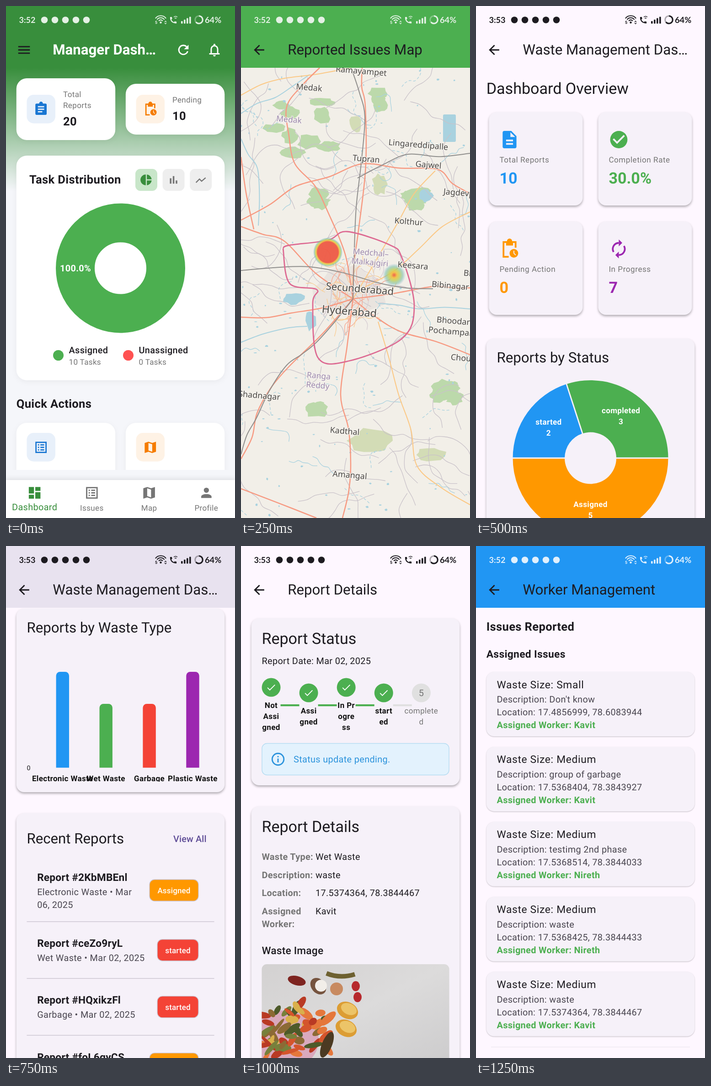
These frames come from a looping animation (501x1119 px, 1500 ms). An HTML page:

```html
<!DOCTYPE html>
<html lang="en">
<head>
<meta charset="utf-8">
<title>Waste management app</title>
<style>
html, body { margin: 0; width: 501px; height: 1119px; overflow: hidden; background: #fef7ff; }
svg { position: absolute; left: 0; top: 0; font-family: Roboto, sans-serif; text-rendering: geometricPrecision; }
.low { filter: drop-shadow(0 1.5px 1.2px rgba(0,0,0,.24)); }
.high { filter: drop-shadow(0 3px 2.5px rgba(0,0,0,.3)); }
.soft { filter: drop-shadow(0 3px 6px rgba(0,0,0,.05)); }
</style>
</head>
<body>
<script>
const W = 501, H = 1119, HOLD = 250;
const DP = 1.4195, EDGE = 16 * DP, INSET = 32 * DP;
const INK = '#1d1b20', GREY = '#757575', DIM = '#49454f', GREEN = '#4caf50', DEEP = '#388e3c', BLUE = '#2196f3',
  ORANGE = '#ff9800', RED = '#f44336', PURPLE = '#9c27b0', PAGE = '#fef7ff', CARD = '#f6f1f9';
const WORKER_A = 'Kavit', WORKER_B = 'Nireth';

// Icons on a 24 unit grid: [filled part, stroked part]
const DISC = 'M2 12a10 10 0 1 0 20 0a10 10 0 1 0-20 0z';
const ICONS = {
  menu: ['', 'M3 7h18M3 12h18M3 17h18'],
  back: ['', 'M20 12H5.500M12.700 4.700L5.400 12l7.300 7.300'],
  refresh: ['M20 4v7h-7z', 'M18.700 14a7 7 0 1 1-1.700-7'],
  bell: ['M10 20h4a2 2 0 0 1-4 0zM10.500 5V4a1.500 1.500 0 0 1 3 0v1z', 'M4 18h16M7 18v-7a5 5.500 0 0 1 10 0v7'],
  clipboard: ['M5 3h4a3 3 0 0 1 6 0h4q2 0 2 2v14q0 2-2 2H5q-2 0-2-2V5q0-2 2-2zM7 7h10v2H7zM7 11h10v2H7zM7 15h7v2H7z', ''],
  pending: ['M8 3h1a3 3 0 0 1 6 0h1v5H8zM12 17a5 5 0 1 0 10 0a5 5 0 1 0-10 0zM16.500 14h1v2.800l1.900 1.900-.7.700-2.200-2.200z', 'M11 21H5V4h14v6.500'],
  pie: ['M11 2a10 10 0 0 0 0 20zM13 2v9h9a10 10 0 0 0-9-9zM13 13v9a10 10 0 0 0 9-9z', ''],
  bars: ['', 'M6.500 9v10M12 5v14M17.500 13v6'],
  trend: ['', 'M3 17l6.500-6.500 4 4L21 8'],
  list: ['', 'M4 4h16v16H4zM7 8h2m2 0h6M7 12h2m2 0h6M7 16h2m2 0h6'],
  map: ['M3 5l6-2 6 2 6-2v16l-6 2-6-2-6 2zM9 5v12l6 2V7z', ''],
  tiles: ['M3 3h8v10H3zM3 15h8v6H3zM13 11h8v10h-8zM13 3h8v6h-8z', ''],
  person: ['M8 8a4 4 0 1 0 8 0a4 4 0 1 0-8 0zM4 20v-2c0-5.300 16-5.300 16 0v2z', ''],
  page: ['M6 2h8l6 6v12q0 2-2 2H6q-2 0-2-2V4q0-2 2-2zM13 3.500V9h5.500zM8 12h8v2H8zM8 16h8v2H8z', ''],
  done: [DISC + 'M10 17l-5-5 1.400-1.400 3.600 3.600 7.600-7.600L19 8z', ''],
  renew: ['M12 1v8l4-4zM12 23v-8l-4 4z', 'M12 5a7 7 0 0 0-6 10.500M12 19a7 7 0 0 0 6-10.500'],
  check: ['', 'M4 12.700l5 5L20.300 6.400'],
  info: ['', 'M3 12a9 9 0 1 0 18 0a9 9 0 1 0-18 0zM12 7v2m0 2v6'],
  phone: ['M4 3h4l1 5-2.500 2.500q2.500 5 7 7L16 15l5 1v4q0 1-1 1Q3 20 3 4q0-1 1-1z', '']
};

const range = (n, fn) => Array.from({ length: n }, (_, i) => fn(i)).join('');
const each = (list, fn) => list.map(fn).join('');
const rect = (x, y, w, h, fill, r = 0, extra = '') =>
  `<rect x="${x}" y="${y}" width="${w}" height="${h}" rx="${r}" fill="${fill}" ${extra}/>`;
const circle = (x, y, r, fill, extra = '') => `<circle cx="${x}" cy="${y}" r="${r}" fill="${fill}" ${extra}/>`;
const oval = (x, y, rx, ry, fill, turn = 0) =>
  `<ellipse cx="${x}" cy="${y}" rx="${rx}" ry="${ry}" fill="${fill}" transform="rotate(${turn} ${x} ${y})"/>`;
const line = (d, stroke, w, extra = '') =>
  `<path d="${d}" fill="none" stroke="${stroke}" stroke-width="${w}" ${extra}/>`;
const icon = (name, x, y, size, fill, w = 2) =>
  `<g transform="translate(${x - size / 2} ${y - size / 2}) scale(${size / 24})">` +
  `<path d="${ICONS[name][0]}" fill="${fill}" fill-rule="evenodd"/>${line(ICONS[name][1], fill, name === 'bars' ? 3 : w)}</g>`;
const text = (x, y, s, size, fill = INK, { w = 400, ls = 0, mid = false, extra = '' } = {}) =>
  `<text x="${x}" y="${y}" font-size="${size}" fill="${fill}" font-weight="${w}" letter-spacing="${ls}"` +
  `${mid ? ' text-anchor="middle"' : ''} ${extra}>${s}</text>`;

const SPACE = .25 * DP;
const body = (x, y, s, fill = INK, w = 400, mid = false) => text(x, y, s, 14 * DP, fill, { w, ls: SPACE, mid });
const small = (x, y, s, fill = GREY, o = {}) => text(x, y, s, 12 * DP, fill, { ls: SPACE, ...o });
const large = (x, y, s, w = 400, ls = .5 * DP) => text(x, y, s, 16 * DP, INK, { w, ls });
const head = (x, y, s, w = 700) => text(x, y, s, 18 * DP, INK, { w, ls: SPACE });
const title = (x, y, s) => text(x, y, s, 22 * DP);
const display = (x, y, s, fill = INK, w = 400) => text(x, y, s, 24 * DP, fill, { w });
const card = (y, h, cls = 'high') => rect(EDGE, y, W - 2 * EDGE, h, CARD, 12 * DP, `class="${cls}"`);

// Seeded random numbers, one stream per picture
function random(seed) {
  return (a = 0, b = 1) => a + (b - a) * (seed = seed * 16807 % 2147483647) / 2147483647;
}

function statusBar(time, c) {
  const wave = r => line(`M${338.5 - r * .8} ${36 - r * .62}A${r} ${r} 0 0 1 ${338.5 + r * .8} ${36 - r * .62}`, c, 2.1);
  const clock = { w: 700, extra: 'font-family="Lato, sans-serif"' };
  const ring = extra => circle(422, 30, 8.3, 'none', `stroke="${c}" stroke-width="3" ${extra}`);
  return text(28.5, 36.5, time, 18, c, clock) + range(5, i => circle(84 + i * 23, 30.5, 7.3, c)) +
    range(3, i => wave(5.5 + i * 4.5)) + circle(338.5, 36, 2.2, c) +
    text(326, 39, '5', 9, c, { w: 700 }) + line('M347 35l2-2 2 2M347 37l2 2 2-2', c, 1.3) +
    icon('phone', 366, 31, 19, c) + line('M367 24q4-3 8 0M369 27q2-1.500 4 0', c, 1.4) +
    range(4, i => rect(383 + i * 6, 33 - i * 3.2, 3.6, 5.4 + i * 3.2, c, 1)) +
    ring('opacity=".35"') + ring('pathLength="100" stroke-dasharray="64 100" transform="rotate(-90 422 30)"') +
    text(435, 36.5, '64%', 18.3, c, clock);
}

function topBar(time, c, bg, name) {
  return rect(0, 0, W, 135, bg) + statusBar(time, c) + icon('back', 39.5, 96, 34, INK) + title(72 * DP, 106, name);
}

function home() {
  const half = (W - 3 * EDGE) / 2, second = 2 * EDGE + half;
  const panel = (x, y, w, h) => rect(x, y, w, h, '#fff', 16 * DP, 'class="soft"');
  const tile = (x, y, name, fill, bg) => rect(x, y, 62.5, 62.5, bg, 15) + icon(name, x + 31.2, y + 31.5, 33, fill);
  const blueTile = (y, name) => tile(INSET, y, name, '#1976d2', '#e8f0fa');
  const orangeTile = (y, name) => tile(second + EDGE, y, name, '#f57c00', '#fef2e5');
  const legend = (x, fill, name, count) => circle(x, 763.5, 11.5, fill) +
    body(x + 23, 759, name, INK, 500) + small(x + 23, 784, count);
  const tabs = each(['pie', 'bars', 'trend'], (name, i) => {
    const x = 283 + i * 59.6;
    return rect(x, 356, 48, 48, i ? '#eee' : '#c8e6c9', 11) + icon(name, x + 24, 380, 28, i ? GREY : DEEP);
  });
  const nav = each(['tiles Dashboard', 'list Issues', 'map Map', 'person Profile'], (item, i) => {
    const [name, label] = item.split(' '), x = W * (i + .5) / 4, c = i ? GREY : DEEP;
    return icon(name, x, 1064, 34, c) + (i ? small(x, 1103, label, c, { mid: true }) : body(x, 1102, label, c, 400, true));
  });
  return `<defs><linearGradient id="fade" x2="0" y2="1"><stop stop-color="${DEEP}"/><stop offset="1" stop-color="#f5f6fa"/></linearGradient>
    <clipPath id="list"><rect width="501" height="1014"/></clipPath></defs>` +
    rect(0, 0, W, H, '#f5f6fa') + rect(0, 135, W, 270, 'url(#fade)') + rect(0, 0, W, 136, DEEP) +
    statusBar('3:52', '#e4f1e5') + icon('menu', 39.5, 96, 34, INK) +
    text(72 * DP, 106, 'Manager Dash…', 22 * DP, '#fff', { w: 700 }) +
    icon('refresh', 388, 96, 34, '#fff') + icon('bell', 456, 96, 34, '#fff') +
    panel(EDGE, 158, half, 135) + blueTile(194, 'clipboard') +
    small(125, 199, 'Total') + small(125, 223, 'Reports') + head(125, 261, '20') +
    panel(second, 170, half, 111) + orangeTile(194, 'pending') + small(364, 211, 'Pending') + head(364, 249, '10') +
    panel(EDGE, 327, W - 2 * EDGE, 491) + head(51, 388, 'Task Distribution', 600) + tabs +
    circle(W / 2, 573, 99, 'none', `stroke="${GREEN}" stroke-width="85"`) +
    body(152, 580, '100.0%', '#fff', 700, true) +
    legend(114.5, GREEN, 'Assigned', '10 Tasks') + legend(267.5, '#ff5252', 'Unassigned', '0 Tasks') +
    head(EDGE, 878, 'Quick Actions', 600) +
    `<g clip-path="url(#list)">${panel(EDGE, 911, half, 200)}${panel(second, 911, half, 200)}</g>` +
    blueTile(933, 'list') + orangeTile(933, 'map') +
    rect(0, 1036, W, 83, '#fff', 0, 'style="filter:drop-shadow(0 -3px 5px rgba(0,0,0,.09))"') + nav;
}

function mapScreen() {
  const rnd = random(11), top = 135, hub = '245,640 ';
  const anywhere = () => [rnd(0, W), rnd(top, H)];
  const parse = s => s.trim().split(' ').map(p => p.split(',').map(Number));
  const curve = p => {
    let d = `M${p[0]}`;
    for (let i = 0; i < p.length - 1; i++) {
      const a = p[i - 1] || p[i], b = p[i], c = p[i + 1], e = p[i + 2] || c;
      d += `C${b[0] + (c[0] - a[0]) / 6} ${b[1] + (c[1] - a[1]) / 6} ${c[0] - (e[0] - b[0]) / 6} ${c[1] - (e[1] - b[1]) / 6} ${c}`;
    }
    return d;
  };
  // Adds a slightly displaced point inside every stretch
  const wander = p => p.flatMap((a, i) => {
    if (!i) return [a];
    const b = p[i - 1], k = rnd(-.07, .07);
    return [[(a[0] + b[0]) / 2 + (a[1] - b[1]) * k, (a[1] + b[1]) / 2 - (a[0] - b[0]) * k], a];
  });
  const way = (c, w) => s => line(curve(wander(parse(s))), c, w);
  const trunk = way('#f79a82', 2.5), main = way('#fbc987', 2.1), rail = way('#8f8e8c', 2), river = way('#a9d2df', 2);
  const walk = ([x, y], n, step, bend) => {
    let a = rnd(0, 6.28);
    const p = [[x, y]];
    while (n--) {
      a += rnd(-bend, bend);
      p.push([x += Math.cos(a) * step, y += Math.sin(a) * step]);
    }
    return curve(p);
  };
  const blob = (x, y, rx, ry, fill) => `<polygon fill="${fill}" points="${range(14, i => {
    const k = rnd(.7, 1.1), a = i * Math.PI / 7;
    return `${x + Math.cos(a) * rx * k},${y + Math.sin(a) * ry * k} `;
  })}"/>`;
  const WATER = '#a9d2df', WOOD = '#bcd9ab', KHAKI = '#d3dcb6';
  const forest = (x, y, n, spread) => range(n, () =>
    blob(x + rnd(-spread, spread), y + rnd(-.6, .6) * spread, rnd(14, 30), rnd(10, 20), WOOD));
  const land = forest(135, 220, 4, 48) + forest(140, 308, 6, 75) + forest(158, 420, 4, 16) + forest(300, 205, 3, 22) +
    forest(382, 425, 4, 26) + forest(452, 840, 8, 32) + forest(165, 880, 2, 12) +
    blob(250, 258, 14, 20, KHAKI) + blob(303, 390, 17, 26, KHAKI) + blob(280, 950, 52, 26, KHAKI) + blob(415, 981, 36, 15, KHAKI);
  const water = range(130, () => blob(...anywhere(), rnd(1, 4), rnd(1, 3), WATER)) +
    rect(442, 237, 28, 60, WATER, 3) + blob(405, 415, 16, 15, WATER) + blob(115, 640, 26, 14, WATER) + blob(152, 688, 13, 22, WATER) +
    range(46, i => line(walk(anywhere(), 6, 11, 1), WATER, 1.3, i % 2 ? 'stroke-dasharray="6 4"' : ''));
  const lanes = range(85, () => line(walk(anywhere(), 7, 20, .65), '#c9c2c9', 1.3)) +
    range(60, i => line(walk([238 + rnd(-70, 70), 622 + rnd(-62, 62)], 4, 12, .8), ['#f9cf98', '#d8cfd4', '#f7ab95'][i % 3], 1.4));
  const roads = river('0,235 75,200 150,150') + river('0,290 36,355 38,480') + river('300,650 390,662 501,662') + river('0,735 95,705 145,700') +
    main('0,195 95,158 240,135') + main(hub + '345,470 425,360') + main('300,690 345,850 385,1005 501,1090') + main('501,450 390,530 270,615') +
    trunk(hub + '257,490 272,220 265,135') + trunk(hub + '190,450 118,345 100,220 172,135') + trunk(hub + '95,514 0,482') +
    trunk(hub + '110,671 0,680') + trunk(hub + '420,613 501,616') + trunk(hub + '350,712 501,762') +
    trunk(hub + '218,850 240,1000 222,1119') + trunk(hub + '105,788 35,890 0,990') +
    trunk('0,468 120,394 265,345 430,357 501,410') + trunk('0,1055 165,1119') + trunk('0,330 28,488') +
    rail(hub + '252,440 271,243 241,135') + rail(hub + '165,735 100,785 34,900 0,980') +
    rail('0,578 150,570 300,605 420,618') + rail('255,376 365,324 501,322') +
    line(curve(parse('92,530 105,523 190,512 232,493 325,522 352,550 379,655 352,727 235,776 168,768 157,650 166,620 106,606 92,530')), '#dd6a92', 2.8);

  const SPECTRUM = ['#ee5a45', '#f3c244', '#c0d060', '#74bda4', '#6fa8d0'];
  const heat = (id, x, y, r, core) => `<radialGradient id="${id}">${each(SPECTRUM, (c, i) =>
    `<stop offset="${core + (1 - core) * i / 4}" stop-color="${c}" stop-opacity="${.95 * (1 - (i / 4) ** 3)}"/>`)}</radialGradient>` +
    circle(x, y, r, `url(#${id})`);

  const label = (x, y, s, size = 18, fill = '#4a4845', anchor = 'middle') =>
    `<text transform="translate(${x} ${y}) rotate(4.8)" dy=".35em" font-size="${size}" fill="${fill}" text-anchor="${anchor}">${s}</text>`;
  const region = (x, y, s) => label(x, y, s, 17.5, '#9d89ae');
  const open = (x, y, s) => label(x, y, s, 18, '#4a4845', 'start');
  const names = region(105, 248, 'Medak') + region(284, 539, 'Medchal–') + region(282, 560, 'Malkajgiri') +
    region(170, 808, 'Ranga') + region(168, 829, 'Reddy') +
    label(263, 142, 'Ramayampet') + label(149, 178, 'Medak') + label(388, 303, 'Lingareddipalle') + label(274, 334, 'Tupran') +
    label(410, 347, 'Gajwel') + label(367, 471, 'Kolthur') + label(376, 567, 'Keesara') + label(458, 611, 'Bibinagar') +
    label(40, 851, 'Shadnagar') + label(227, 929, 'Kadthal') + label(238, 1025, 'Amangal') +
    open(443, 405, 'Jagdevpur') + open(487, 583, 'Bhongir') + open(428, 685, 'Bhoodan') + open(410, 707, 'Pochampally') +
    open(459, 767, 'Choutuppal') + label(260, 618, 'Secunderabad', 22) + label(237, 667, 'Hyderabad', 23.3);
  return rect(0, top, W, H - top, '#f2efe8') + land + blob(238, 620, 80, 65, '#e9e4df') + water + lanes + roads +
    heat('hot', 190, 538, 32, .72) + heat('warm', 335, 588, 25, 0) +
    `<g font-family="Noto Sans, sans-serif" stroke="#f6f4ef" stroke-width="3" stroke-opacity=".8" paint-order="stroke">${names}</g>` +
    topBar('3:52', '#e4f1e5', GREEN, 'Reported Issues Map');
}

function overview() {
  const stats = [['page', 'Total Reports', '10', BLUE], ['done', 'Completion Rate', '30.0%', GREEN],
    ['pending', 'Pending Action', '0', ORANGE], ['renew', 'In Progress', '7', PURPLE]];
  const stat = ([name, label, value, c], i) => {
    const x = 28.4 + i % 2 * 239, y = 232 + (i >> 1) * 239;
    return rect(x, y, 205, 204, CARD, 12 * DP, 'class="high"') + icon(name, x + 45, y + 60, 32 * DP, c) +
      small(x + 23, y + 110, label, GREY, { ls: .4 * DP }) + display(x + 23, y + 156, value, c, 700);
  };
  const parts = [['completed', 3, GREEN], ['started', 2, BLUE], ['Assigned', 5, ORANGE]];
  const cx = W / 2, cy = 988, R = 170, r = 56.5;
  const at = (turn, rad) => [cx + rad * Math.cos(turn * 2 * Math.PI), cy - rad * Math.sin(turn * 2 * Math.PI)];
  let turn = 0, slices = '', seams = '', tags = '';
  for (const [name, n, c] of parts) {
    const end = turn + n / 10, [x, y] = at((turn + end) / 2, (R + r) / 2);
    slices += `<path fill="${c}" d="M${at(turn, r)}L${at(turn, R)}A${R} ${R} 0 0 0 ${at(end, R)}L${at(end, r)}A${r} ${r} 0 0 1 ${at(turn, r)}"/>`;
    seams += line(`M${at(turn, r - 1)}L${at(turn, R + 1)}`, CARD, 2.8);
    tags += [name, n].map((s, i) => small(x, y - 6 + i * 24, s, '#fff', { w: 700, mid: true })).join('');
    turn = end;
  }
  return rect(0, 0, W, H, PAGE) + topBar('3:53', INK, PAGE, 'Waste Management Das…') +
    display(EDGE, 192, 'Dashboard Overview') + each(stats, stat) +
    card(727, 480) + title(INSET, 779, 'Reports by Status') + slices + seams + tags;
}

function reports() {
  const types = [['Electronic Waste', 3, BLUE], ['Wet Waste', 2, GREEN], ['Garbage', 2, RED], ['Plastic Waste', 3, PURPLE]];
  const list = [['2KbMBEnl', 'Assigned', 'Electronic Waste • Mar', '06, 2025'], ['ceZo9ryL', 'started', 'Wet Waste • Mar 02, 2025'],
    ['HQxikzFl', 'started', 'Garbage • Mar 02, 2025'], ['foL6gyCS', 'Assigned', '']];
  const base = 484.5, bar = 20 * DP;
  const chart = each(types, ([name, n, c], i) => {
    const x = 109.6 + i * 94.9, h = n * 69.8;
    return `<g clip-path="url(#plot)">${rect(x, base - h, bar, h + 20, c, 6 * DP)}</g>` +
      `<g clip-path="url(#axis)">${small(x + bar / 2, 514, name, '#111', { w: 700, mid: true })}</g>`;
  });
  let y = 677;
  const rows = each(list, ([id, state, ...lines]) => {
    const extra = lines.length - 1, mid = y + 62 + extra * 13.5, busy = state === 'started', w = busy ? 90 : 107;
    const row = text(48 * DP, y + 55, `Report #${id}`, 16 * DP, INK, { w: 700, ls: .15 * DP }) +
      each(lines, (s, i) => body(48 * DP, y + 86 + i * 28.4, s, DIM)) +
      rect(421 - w, mid - 23.5, w, 47, busy ? RED : ORANGE, 11, 'stroke="#cac4d0" stroke-width="1.4"') +
      small(421 - w / 2, mid + 6.5, state, '#fff', { w: 500, ls: .14, mid: true });
    y += 124.2 + extra * 20;
    return row + rect(INSET, y - .9, W - 2 * INSET, 1.4, '#cac4d0');
  });
  return `<defs><clipPath id="plot"><rect width="501" height="${base}"/></clipPath>
    <clipPath id="axis"><rect y="490" width="501" height="25"/></clipPath></defs>` +
    rect(0, 0, W, H, PAGE) + card(137, 401) + topBar('3:53', INK, '#e8e2ef', 'Waste Management Das…') +
    title(INSET, 189, 'Reports by Waste Type') + text(INSET, 490, '0', 10 * DP) + chart +
    card(584, 600) + title(INSET, 650, 'Recent Reports') +
    text(366, 647, 'View All', 14 * DP, '#5f4d97', { w: 500, ls: .14 }) + rows;
}

function photo() {
  const rnd = random(5), SCRAPS = ['#e5773b', '#b93a24', '#77803c', '#d9b04c', '#8c6a35', '#4d5a2a', '#d4552c'];
  const scraps = range(60, i => {
    const x = rnd(45, 195), y = rnd(990 + Math.abs(x - 115) * .5, H);
    return oval(x, y, rnd(9, 22), rnd(4, 9), SCRAPS[i % SCRAPS.length], rnd(-70, 60));
  });
  const stains = range(25, () => oval(rnd(260, 456), rnd(920, H), rnd(15, 50), rnd(6, 20), i % 2 ? '#e8e7e7' : '#cfcecf', rnd(-40, 40)));
  return '';
}

function wastePhoto() {
  const rnd = random(5), SCRAPS = ['#e5773b', '#b93a24', '#77803c', '#d9b04c', '#8c6a35', '#4d5a2a', '#d4552c'];
  const scraps = range(60, i => {
    const x = rnd(45, 195), y = rnd(990 + Math.abs(x - 115) * .5, H);
    return oval(x, y, rnd(9, 22), rnd(4, 9), SCRAPS[i % SCRAPS.length], rnd(-70, 60));
  });
  const lemon = (x, y) => oval(x, y, 24, 18, '#dc9d34', 25) + oval(x + 3, y - 3, 18, 12, '#ecc468', 25);
  const berry = (x, y) => oval(x, y, 9, 11, '#b7292d');
  return `<defs><linearGradient id="stone" x2="1" y2="1"><stop stop-color="#d3d1d1"/><stop offset=".5" stop-color="#dcdbdb"/><stop offset="1" stop-color="#cdcccd"/></linearGradient>
    <clipPath id="frame"><rect x="${INSET}" y="914" width="${W - 2 * INSET}" height="240" rx="11"/></clipPath></defs>
    <g clip-path="url(#frame)">` + rect(45, 914, 411, 210, 'url(#stone)') +
    oval(95, 1080, 75, 65, '#d9a9bd') + scraps +
    oval(122, 950, 20, 10, '#7e2420', 15) + line('M187 934q30 12 62 2', '#6d6030', 10) +
    oval(169, 962, 20, 15, '#76543f', 50) + circle(175, 961, 13, '#f2eee9') + circle(209, 968, 14, '#c88a60') +
    berry(251, 962) + berry(255, 986) + lemon(233, 1015) + lemon(230, 1054) +
    oval(188, 1090, 11, 30, '#4b3a22', 22) + '</g>';
}

function details() {
  const steps = ['Not Assi gned', 'Assi gned', 'In_Pr ogre ss', 'start ed', 'complete d'];
  const facts = [['Waste Type:', 'Wet Waste'], ['Description:', 'waste'], ['Location:', '17.5374364, 78.3844467'], ['Assigned', WORKER_A]];
  const stepper = each(steps, (s, i) => {
    const x = 66 + i * 82.1, words = s.split(' '), y = words.length > 2 ? 309 : 321, past = i < 4;
    return (past ? rect(x + 20.5, 346, 41, 4.2, i < 3 ? GREEN : '#e0e0e0') : '') + circle(x, y, 20.5, past ? GREEN : '#e0e0e0') +
      (past ? icon('check', x, y, 24, '#fff', 1.8) : text(x, y + 7, i + 1, 14 * DP, GREY, { mid: true })) +
      each(words, (p, k) => small(x, y + 45 + k * 24, p.replace('_', ' '), past ? '#111' : GREY, { w: past ? 700 : 400, mid: true }));
  });
  return rect(0, 0, W, H, PAGE) + topBar('3:53', INK, PAGE, 'Report Details') +
    card(158, 365) + display(INSET, 214, 'Report Status') + body(INSET, 258, 'Report Date: Mar 02, 2025') + stepper +
    rect(INSET + .5, 431.5, W - 2 * INSET - 1, 69, '#e3f2fd', 11, 'stroke="#b5dcf2" stroke-width="1.4"') +
    icon('info', 81, 466, 34, '#2b93dc') + body(115, 473, 'Status update pending.', '#2b93dc') +
    card(569, 640) + display(INSET, 625, 'Report Details') +
    each(facts, ([k, v], i) => body(INSET, 686 + i * 39.6, k, GREY, 700) + body(163, 686 + i * 39.6, v)) +
    body(INSET, 833, 'Worker:', GREY, 700) + large(INSET, 892, 'Waste Image', 500, .15 * DP) + wastePhoto();
}

function workers() {
  const issues = [
    ['Small', "Don't know", '17.4856999, 78.6083944', WORKER_A],
    ['Medium', 'group of garbage', '17.5368404, 78.3843927', WORKER_A],
    ['Medium', 'testimg 2nd phase', '17.5368514, 78.3844033', WORKER_B],
    ['Medium', 'waste', '17.5368425, 78.3844433', WORKER_B],
    ['Medium', 'waste', '17.5374364, 78.3844467', WORKER_A]
  ];
  return rect(0, 0, W, H, PAGE) + topBar('3:52', '#e1f0fd', BLUE, 'Worker Management') +
    head(EDGE, 185, 'Issues Reported') + large(EDGE, 244, 'Assigned Issues', 700, SPACE) +
    each(issues, ([size, note, place, who], i) => {
      const y = 275 + i * 163.9;
      return card(y, 141, 'low') + large(INSET, y + 35.5, `Waste Size: ${size}`) +
        body(INSET, y + 67, `Description: ${note}`, DIM) + body(INSET, y + 95, `Location: ${place}`, DIM) +
        body(INSET, y + 123, `Assigned Worker: ${who}`, GREEN, 700);
    }) + rect(33, 1094, 435, 2, '#f3edf5');
}

const screens = [home, mapScreen, overview, reports, details, workers];
const total = screens.length * HOLD;
document.body.innerHTML = each(screens, draw =>
  `<svg width="${W}" height="${H}" viewBox="0 0 ${W} ${H}">${draw()}</svg>`);
document.querySelectorAll('svg').forEach((svg, i) => svg.animate([
  { opacity: 1, offset: 0, easing: 'step-end' },
  { opacity: 0, offset: 1 / screens.length, easing: 'step-end' },
  { opacity: 0, offset: 1 }
], { duration: total, delay: i ? i * HOLD - total : 0, iterations: Infinity }));
</script>
</body>
</html>
```
